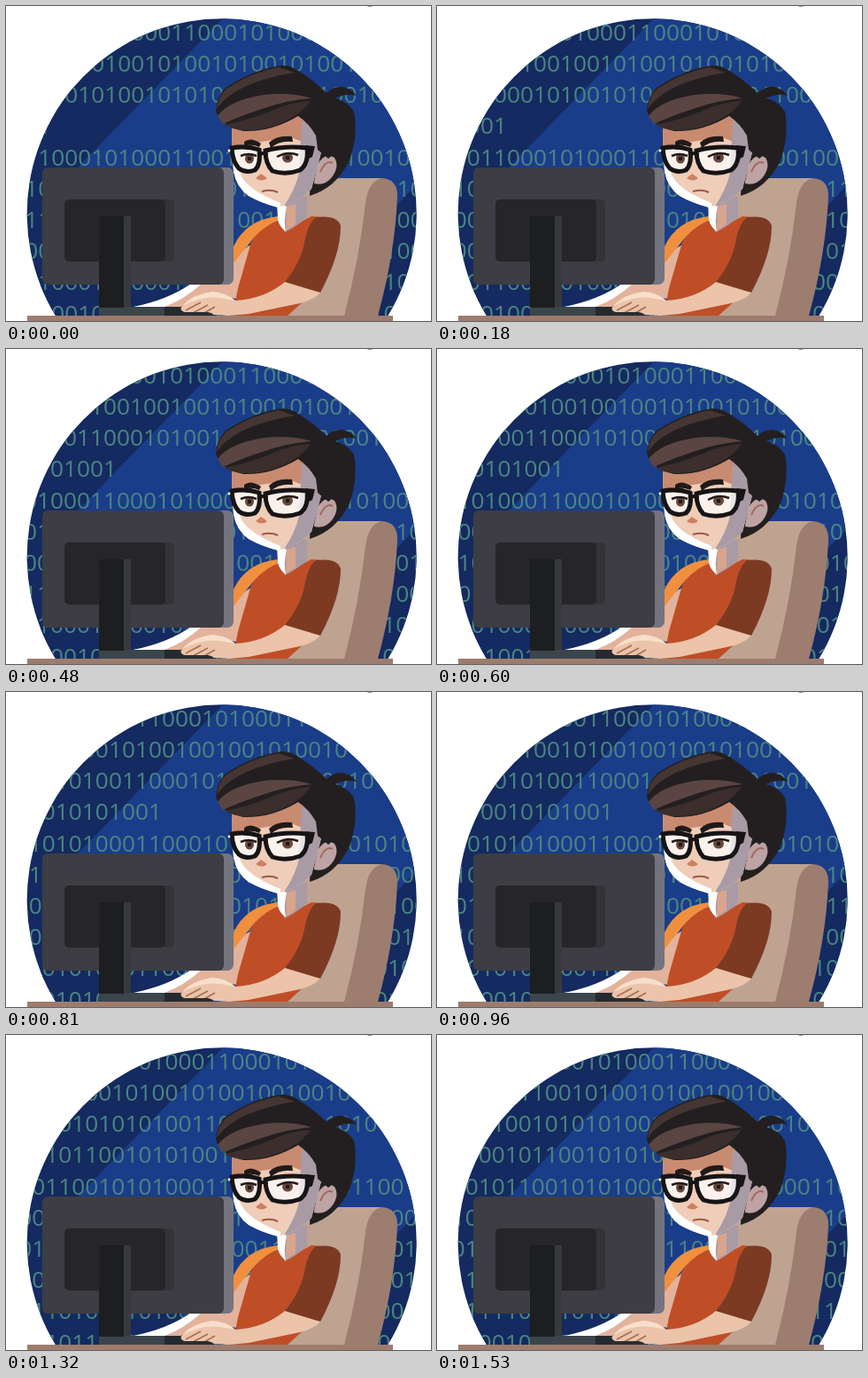
Write an HTML page that moves like this. It is 480 by 355 pixels and loops after 1560 ms.

```html
<!DOCTYPE html>
<html lang="en">
<head>
<meta charset="utf-8">
<title>Coder at night</title>
<style>
  html, body { margin: 0; width: 100%; height: 100%; overflow: hidden; background: #fff; }
  svg { display: block; width: 480px; height: 355px; }
  #digits { font: 26.25px "Open Sans", "Noto Sans", sans-serif; fill: #4b8680; }
</style>
</head>
<body>
<svg viewBox="0 0 480 355">
  <defs>
    <clipPath id="disc"><path d="M56 349A220 220 0 1 1 431.4 349Z"/></clipPath>
    <clipPath id="face"><path id="faceShape" d="M255 130Q255 162 257 186Q260 204 274 214Q288 222 307 227Q330 222 345 206L356 165V110H262Z"/></clipPath>
  </defs>

  <path d="M407 -1Q411 1.5 415 -1" fill="none" stroke="#777" stroke-width="1.2"/>

  <g clip-path="url(#disc)">
    <path fill="#142a60" d="M0 0H480V355H0Z"/>
    <path fill="#1a3d8a" d="M246 13L80 183L140 349H320L470 195V0H246Z"/>
    <path fill="#142a60" d="M24 314H200V349H24Z"/>
    <g id="digits"></g>
  </g>

  <g id="chair">
    <path fill="#bfa391" d="M334 214Q346 195 364 194H424L390 349H318Z"/>
    <path fill="#9d7d6f" d="M424 194Q443 195 442 216Q439 280 420 349H382Q399 285 406 222Q409 198 424 194Z"/>
  </g>

  <g id="arm">
    <path fill="#e3b29c" d="M252 284L282 266L270 331L236 327Q209 331 196 340H150Q184 332 212 313H252Z"/>
    <path fill="#fff" d="M144 339Q183 331 209 313H221Q201 331 179 339Z"/>
  </g>

  <g id="shirt">
    <path fill="#bf4e27" d="M256 349L262 318L277 266Q290 244 307 239L326 247L345 237L368 239L350 320L318 349Z"/>
    <path fill="#f0903f" d="M257 290V271Q271 241 307 237L309 241Q294 246 281 260Q271 272 257 290Z"/>
    <path fill="#7c3a23" d="M350 238Q375 235 378 248Q378 280 355 323Q333 320 315 311Q334 288 338 262Q342 244 350 238Z"/>
  </g>

  <g id="neck">
    <path fill="#a99ba5" d="M307 215H340V238Q329 248 315 255L307 242Z"/>
    <path fill="#fff" d="M306 222L317 226Q313 243 316 254Q309 249 307 241Z"/>
    <path fill="#d9a48c" d="M317 226L327 223V246L316 253Z"/>
  </g>

  <g id="head">
    <path fill="#231f20" d="M344 104Q384 104 393 119Q398 145 388 174Q373 205 343 214L345 165Z"/>
    <use href="#faceShape" fill="#efcdb8"/>
    <g clip-path="url(#face)">
      <path fill="#c98b70" d="M250 120H365V165L322 148L255 158Z"/>
      <path fill="#a99ba5" d="M334 130L331 188Q327 207 311 230H365V120Z"/>
      <path fill="#fff" d="M254 160L259 162Q260 178 265 190Q272 207 310 222V232H255Z"/>
    </g>
    <path fill="#bda3a3" d="M348 198L352 178Q361 164 371 171Q377 181 368 193Q360 203 348 200Z"/>
    <path fill="none" stroke="#a2685d" stroke-width="2" d="M355 187Q361 173 369 177"/>

    <path fill="#231f20" d="M237 118Q238 102 248 92Q280 71 312 67Q322 67 330 73Q348 84 362 98Q370 90 380 91Q390 93 396 101Q383 98 372 104Q389 109 393 121L390 151L364 172L352 162L350 146Q342 132 330 124Q300 142 268 141Q242 135 237 118Z"/>
    <path fill="#453533" d="M238 116Q239 103 249 93Q278 74 308 69L326 75Q285 82 262 95Q246 104 238 116Z"/>
    <path fill="#5b4542" d="M239 124Q252 106 292 100Q322 97 345 104Q318 106 292 115Q264 124 245 133Z"/>
    <path fill="#3b2e2d" d="M247 134Q276 128 300 118Q322 108 344 107Q336 118 326 124Q298 141 268 140Q255 139 247 134Z"/>

    <path fill="#211a18" d="M269 153Q276 147 288 155L286 159Q277 155 269 158ZM297 154Q306 145 323 147L324 153Q309 151 299 160Z"/>
    <g fill="#fff" fill-opacity=".72" stroke="#171415" stroke-width="5">
      <path d="M255 160Q271 157 286 162Q288 179 281 185Q271 189 263 183Q256 176 255 160Z"/>
      <path d="M293 163Q315 157 340 160Q342 178 332 185Q316 191 301 186Q293 178 293 163Z"/>
    </g>
    <path fill="none" stroke="#171415" stroke-width="4" d="M285 168Q290 164 295 168"/>
    <path fill="#171415" d="M338 157L349 158L346 170L340 173Z"/>
    <circle cx="252" cy="163" r="1.4" fill="#fff"/>
    <g fill="#67473a">
      <ellipse cx="275" cy="172" rx="5" ry="5.5"/>
      <ellipse cx="318" cy="171" rx="6" ry="5.5"/>
    </g>
    <path fill="none" stroke="#211a18" stroke-width="2.5" d="M265 169Q274 165 283 169M306 170Q318 163 330 168"/>
    <path fill="#211a18" d="M273 170h4v4h-4zM316 169h4v4h-4z"/>
    <path fill="#cd8060" d="M288 189L295 194Q289 199 282 194Z"/>
    <path fill="none" stroke="#9c5947" stroke-width="2" d="M289 209Q299 206 307 210"/>
  </g>

  <g id="monitor">
    <rect x="50" y="182" width="207" height="132" rx="7" fill="#74747f"/>
    <rect x="41" y="182" width="205" height="132" rx="6" fill="#3d3d43"/>
    <rect x="76" y="218" width="114" height="70" rx="5" fill="#333338"/>
    <rect x="66" y="218" width="114" height="70" rx="5" fill="#262629"/>
    <path fill="#38393e" d="M133 237H141V340H133Z"/>
    <path fill="#3b454c" d="M105 339H181V349H105Z"/>
    <path fill="#1d1e20" d="M105 237H133V340H105Z"/>
    <path fill="#242a30" d="M179 339H197L208 349H179Z"/>
  </g>

  <g id="hand">
    <path fill="#ebc4aa" d="M315 311L355 323Q348 331 332 335L274 347L252 349L206 346Q194 344 199 338Q210 325 233 322Q249 323 259 332Q292 330 315 311Z"/>
    <path fill="#f8dfcb" d="M199 338Q211 325 233 322Q249 323 259 332L242 329Q222 326 199 338Z"/>
    <path fill="none" stroke="#a66e54" stroke-width="1.5" d="M203 343L220 334M211 346L228 337M222 347L236 339"/>
    <path fill="#292d32" d="M199 345H228Q234 346 235 349H197Z"/>
  </g>
  <path fill="#9d7c6d" d="M24 349H437V355H24Z"/>
</svg>

<script>
  const LOOP = 1560, STEP = 30, SPEED = 0.154;
  const START_X = -234, FIRST_LINE = 38.7, LINE_HEIGHT = 35.2;

  const lines = [
    "01100101000101000110001010001100010100011000",
    "0101001100101001010010010010100101001010010100",
    "0101100101010100110001010010101001010011001010010",
    "0000010110010101001",
    "0001011001010100011000101000110010101010010010010",
    "010000110110010101011001010011000101001010011101",
    "0010110010110010011001100101001010011001010100010",
    "0110000100101100000100101001100010100101001010010",
    "0011110101010100011000101000110010101001010010110",
    "1010010110010100101001010011000101001010010100110"
  ];

  const digits = document.getElementById("digits");
  lines.forEach((line, i) => {
    const text = document.createElementNS(digits.namespaceURI, "text");
    text.setAttribute("y", FIRST_LINE + i * LINE_HEIGHT);
    text.textContent = line;
    digits.append(text);
  });

  function draw(now) {
    const time = Math.floor(now % LOOP / STEP) * STEP;
    digits.setAttribute("transform", `translate(${START_X + time * SPEED} 0)`);
    requestAnimationFrame(draw);
  }
  draw(0);
</script>
</body>
</html>
```
